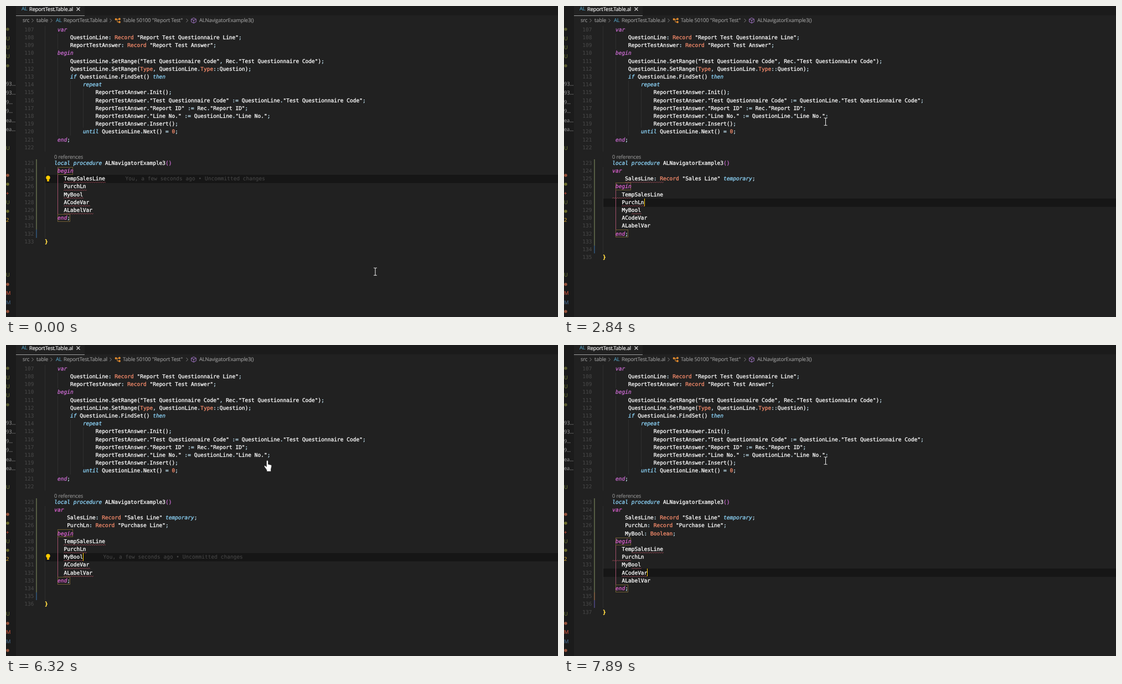
An HTML page for the animation above (8000 ms loop, 997 px wide and 562 px high).

```html
<!DOCTYPE html>
<html lang="en">
<head>
<meta charset="utf-8">
<title>Editor quick fix</title>
<style>
  html, body { margin: 0; width: 100%; height: 100%; overflow: hidden; background: #212121; }
  svg { display: block; width: 100vw; height: 100vh; }
  text, tspan { fill: currentColor; stroke: currentColor; }
  text { white-space: pre; text-rendering: geometricPrecision; stroke-width: .3px; }
  .code { font: 9.54px "DejaVu Sans Mono", monospace; color: #fff; }
  .ui { font: 9.45px "Open Sans", sans-serif; letter-spacing: -.02em; color: #9a9a9a; stroke-width: .15px; }
  .num, .note { color: #464646; stroke-width: .1px; }
  .key { color: #c96bd0; font-style: italic; }
  .word { color: #8ed6fb; font-style: italic; }
  .type { color: #f78c6c; }
  .punct { color: #c4e6f5; }
  .paren { color: #c96bd0; }
  .block .key { color: #dc62d0; }
  rect { shape-rendering: crispEdges; }
</style>
</head>
<body>
<svg viewBox="0 0 997 562" preserveAspectRatio="none">
  <g id="base"></g>
  <g id="live"></g>
</svg>
<script>
const LOOP = 8000, CW = 5.74, LH = 14.2, LEFT = 70;
const base = document.getElementById('base'), live = document.getElementById('live');

const HEAD = [
  '    var',
  '        QuestionLine: Record "Report Test Questionnaire Line";',
  '        ReportTestAnswer: Record "Report Test Answer";',
  '    begin',
  '        QuestionLine.SetRange("Test Questionnaire Code", Rec."Test Questionnaire Code");',
  '        QuestionLine.SetRange(Type, QuestionLine.Type::Question);',
  '        if QuestionLine.FindSet() then',
  '            repeat',
  '                ReportTestAnswer.Init();',
  '                ReportTestAnswer."Test Questionnaire Code" := QuestionLine."Test Questionnaire Code";',
  '                ReportTestAnswer."Report ID" := Rec."Report ID";',
  '                ReportTestAnswer."Line No." := QuestionLine."Line No.";',
  '                ReportTestAnswer.Insert();',
  '            until QuestionLine.Next() = 0;',
  '    end;',
  '',
  '   local procedure ALNavigatorExample3()'
];
const DECLS = [
  '       SalesLine: Record "Sales Line" temporary;',
  '       PurchLn: Record "Purchase Line";',
  '       MyBool: Boolean;'
];
const WORDS = ['TempSalesLine', 'PurchLn', 'MyBool', 'ACodeVar', 'ALabelVar'];
const TYPES = ['Record', 'Codeunit', 'Page', 'Report', 'Query', 'XmlPort', 'Enum', 'BigInteger',
  'BigText', 'Blob', 'Boolean', 'Char', 'Code', 'Date', 'DateFormula', 'DateTime', 'Decimal',
  'Dialog', 'Duration', 'Guid', 'Integer', 'Label'];

const TOKEN = /("[^"]*")|\b(var|begin|end)\b|\b(local|procedure|if|then|repeat|until|temporary)\b|\b(Record|Boolean|Type|0)\b|(\(\)$)|(:=|::|[:;.,=])/g;
const CLASSES = ['', 'key', 'word', 'type', 'paren', 'punct'];

const rowY = n => 42.5 + (n - 107) * LH + (n > 122 ? 13.8 : 0);
const colX = c => LEFT + c * CW;
const within = (t, ...spans) => spans.some(([a, b]) => t >= a && t < b);
const count = (t, ...times) => times.filter(a => t >= a).length;

const rect = (x, y, w, h, fill, extra = '') =>
  `<rect x="${x}" y="${y}" width="${w}" height="${h}" fill="${fill}" ${extra}/>`;
const path = (d, stroke, w = 1, fill = 'none') =>
  `<path d="${d}" fill="${fill}" stroke="${stroke}" stroke-width="${w}"/>`;
const dot = (x, y, r, fill) => `<circle cx="${x}" cy="${y}" r="${r}" fill="${fill}"/>`;
const text = (x, y, s, cls, color) =>
  `<text x="${x}" y="${Math.round(y + 3.3)}" class="${cls}"${color ? ` style="color:${color}"` : ''}>${s}</text>`;

function paint(s) {
  return s.replace(TOKEN, (m, ...groups) => {
    const cls = CLASSES[groups.findIndex(g => g !== undefined)];
    return cls ? `<tspan class="${cls}">${m}</tspan>` : m;
  });
}

function codeRow(n, s) {
  const body = s.trimStart();
  return text(33.3, rowY(n), n, 'code num') +
    (body && text(colX(s.length - body.length), rowY(n), paint(body), 'code'));
}

const guide = (col, from, to) =>
  rect(Math.round(colX(col)), rowY(from) - 7, 1, (to - from + 1) * LH, '#2f2f2f');

function squiggle(n, x1, x2) {
  let d = `M${x1} ${rowY(n) + 7.4}`;
  for (let x = x1, up = true; x < x2; x += 2, up = !up) d += `l2 ${up ? -1.5 : 1.5}`;
  return path(d, '#a04a56', .8);
}

function sidebar() {
  const olive = '#6a6a2c', green = '#6c7636', red = '#94513b', grey = '#858585';
  const marks = (ys, s, color) => ys.map(y => text(0, y, s, 'ui', color)).join('');
  const dots = (ys, fill) => ys.map(y => dot(3, y, 2.8, fill)).join('');
  return rect(0, 0, 18, 562, '#1b1b1b') +
    marks([59, 75, 91, 257, 355, 486], 'U', green) +
    marks([141, 157], '93...', grey) + marks([174, 190], '9...', grey) +
    marks([207, 223], 'ea...', grey) +
    marks([339], '+', '#d0503c') + marks([387], '2', '#c89b2c') +
    marks([519], 'M', '#c9553d') + marks([536], 'M', '#43678a') +
    dots([42, 108], '#56582f') + dots([322, 371], olive) + dots([306, 503, 552], red);
}

function header() {
  const chevron = x => path(`M${x - 1.5} 23l3 3.2l-3 3.2`, '#8a8a8a', .9);
  return rect(142, 0, 855, 17, '#1b1b1b') + rect(18, 16.5, 124, 1, '#a0a0a0') +
    text(28, 5, 'AL', 'ui', '#519aba') + text(42, 5.5, 'ReportTest.Table.al', 'ui', '#fff') +
    path('M127.5 2.5l6 6m0-6l-6 6', '#ddd', 1.1) +
    [48, 82, 189, 327].map(chevron).join('') +
    text(30, 26, 'src', 'ui') + text(55, 26, 'table', 'ui') +
    text(90, 26, 'AL', 'ui', '#519aba') + text(104, 26, 'ReportTest.Table.al', 'ui') +
    path('M199 24h5m-3 0v5h3', '#e08a2e') +
    [[198.5, 24], [205, 23.5], [205, 29]].map(([x, y]) => dot(x, y, 1.9, '#e08a2e')).join('') +
    text(211, 26, 'Table 50100 "Report Test"', 'ui') +
    path('M339 21.5l4.3 2.2v5l-4.3 2.3l-4.3-2.3v-5zm-4.3 2.2l4.3 2.2l4.3-2.2m-4.3 2.2v5', '#a074c4') +
    text(349, 26, 'ALNavigatorExample3()', 'ui');
}

base.innerHTML = rect(0, 0, 997, 562, '#212121') + sidebar() + header() +
  guide(0, 107, 122) + guide(4, 108, 109) + guide(4, 111, 120) + guide(8, 114, 120) + guide(12, 115, 119) +
  HEAD.map((s, i) => codeRow(107 + i, s)).join('') +
  text(87, 272.5, '0 references', 'ui', '#8f8f8f');

function bulb(n) {
  const y = rowY(n);
  return dot(76, y - 1.7, 3.7, '#ffcc00') + rect(74, y + 1, 4, 4, '#e6b400');
}

// Error marks lag behind the text after each insertion.
function errors(t, first) {
  if (within(t, [2290, 3220]))
    return squiggle(125, 110, 179) + squiggle(127, 87, 121) + squiggle(128, 104, 145) + squiggle(129, 122, 139);
  if (within(t, [4320, 5240]))
    return squiggle(128, 104, 145) + squiggle(129, 87, 121) + squiggle(130, 122, 139) + squiggle(131, 104, 150);
  if (t >= 7180)
    return squiggle(129, 122, 179) + squiggle(130, 87, 121) + squiggle(131, 122, 139) + squiggle(132, 104, 150);
  return WORDS.map((w, i) => squiggle(first + i, 104, colX(6 + w.length))).join('');
}

function editor(t) {
  const added = count(t, 2290, 4320, 7180);
  const active = count(t, 2760, 4930, 7640);
  const rows = added ? ['   var', ...DECLS.slice(0, added)] : [];
  const begin = 124 + rows.length, first = begin + 1, end = first + WORDS.length, last = end + 3;
  rows.push('    begin', ...WORDS.map(w => '      ' + w), '    end;', '', '', '}');

  const row = first + active, y = rowY(row), endX = colX(6 + WORDS[active].length);
  const top = rowY(123) - 7;
  let s = rect(LEFT, Math.round(y - 7), 927, 15, '#161616') + guide(0, 124, last - 1);
  s += rect(54, top, 2, rowY(last - 1) - 7 - top, '#555c43');
  if (added === 3) s += rect(54, rowY(last - 2) - 7, 2, LH, '#75573d');
  s += rect(54, rowY(last - 1) - 7, 2, LH, added === 3 ? '#46406f' : '#2f4c68');

  const box = (n, w) => rect(93.5, Math.round(rowY(n) - 7) + .5, w, 13, 'none', 'stroke="#6f5c33"');
  s += rect(93, rowY(begin) + 7, 1, (end - begin) * LH - 14, '#a3506c') + box(begin, 27) + box(end, 22);
  s += `<g class="block">${rows.map((r, i) => codeRow(124 + i, r)).join('')}</g>`;
  s += text(colX(0), rowY(last), '}', 'code', '#ffcc00');
  s += errors(t, first);

  if (within(t, [0, 2290], [3370, 4320], [5390, 7180]))
    s += text(endX + 36.5, y, 'You, a few seconds ago • Uncommitted changes', 'code note');
  if (within(t, [0, 2290], [3370, 4320], [5390, 7410]))
    s += bulb([125, 128, 130][count(t, 2290, 4320)]);
  if (within(t, [590, 1120], [1670, 2220], [2370, 3370], [3920, 4850], [4930, 5470], [5940, 6400], [7180, LOOP]))
    s += rect(Math.round(endX), y - 7, 1, 14, '#ffcc00');
  if (within(t, [1670, 2220], [3850, 4320], [5870, 6250]))
    s += menu(y + 8, WORDS[active]);
  return s;
}

function menu(y, name) {
  return `<g style="filter:drop-shadow(0 1px 3px #0009)">${rect(104, y, 200, 41, '#2a2a2a')}</g>` +
    rect(104, y + 4, 200, 16.5, '#393c3d') +
    text(114, y + 12, `Create local variable ${name}`, 'ui', '#d8d8d8') +
    text(114, y + 28.5, `Create global variable ${name}`, 'ui', '#d8d8d8');
}

function palette(t) {
  if (!within(t, [6400, 7090])) return '';
  const typed = 'boo'.slice(0, count(t, 6630, 6710, 6860));
  const hits = typed === 'bo' ? ['Boolean', 'Blob'] : typed === 'boo' ? ['Boolean'] :
    TYPES.filter(n => n.toLowerCase().startsWith(typed));
  const step = 16.4, caret = 240.5 + typed.length * 5.7;
  let s = `<g style="filter:drop-shadow(0 1px 3px #0009)">${rect(232, 0, 448, 22 + hits.length * step, '#2a2a2a')}</g>`;
  s += rect(236, 0, 439, 15.5, '#1d1d1d', 'stroke="#303030"') + rect(232, 21.5, 448, 17, '#393c3d');
  s += text(240, 7, typed, 'ui', '#fff') + rect(Math.round(caret), 1, 1, 12, '#eee');
  hits.forEach((n, i) => {
    const m = n === 'Blob' ? 1 : typed.length;
    s += text(240, 30 + i * step, `<tspan style="color:#5cc4f2">${n.slice(0, m)}</tspan>${n.slice(m)}`, 'ui', '#e8e8e8');
  });
  return s;
}

const MOVES = [[0, 667, 480], [70, 400, 382], [130, 155, 291], [360, 164, 298], [430, 178, 306], [510, 188, 311],
  [660, 215, 300], [740, 325, 258], [820, 435, 222], [890, 472.5, 209]];

function pointer(t) {
  if (within(t, [1600, 2290], [3770, 4320], [5790, 6400]))
    return path('M470.5 210.5q0-2 1.5-2t1.5 2v5l5 1.2q1.5.5 1.2 2.3l-1.2 5.5v4h-7.5v-2.5l-4.3-6q-.7-1.8.8-2.2l3 2.2z', '#222', .6, '#fff');
  const [, x, y] = MOVES.filter(m => t >= m[0]).pop();
  const d = `M${x - 3} ${y - 6.8}h2q1 0 1 1v11.6q0 1-1 1h-2m6 0h-2q-1 0-1-1v-11.6q0-1 1-1h2`;
  return path(d, '#111', 2.2) + path(d, '#eee', 1.1);
}

let shown = '';
function draw(t) {
  const next = editor(t) + palette(t) + pointer(t);
  if (next !== shown) live.innerHTML = shown = next;
}

const start = performance.now();
function tick() {
  draw((performance.now() - start) % LOOP);
  requestAnimationFrame(tick);
}
tick();
</script>
</body>
</html>
```
